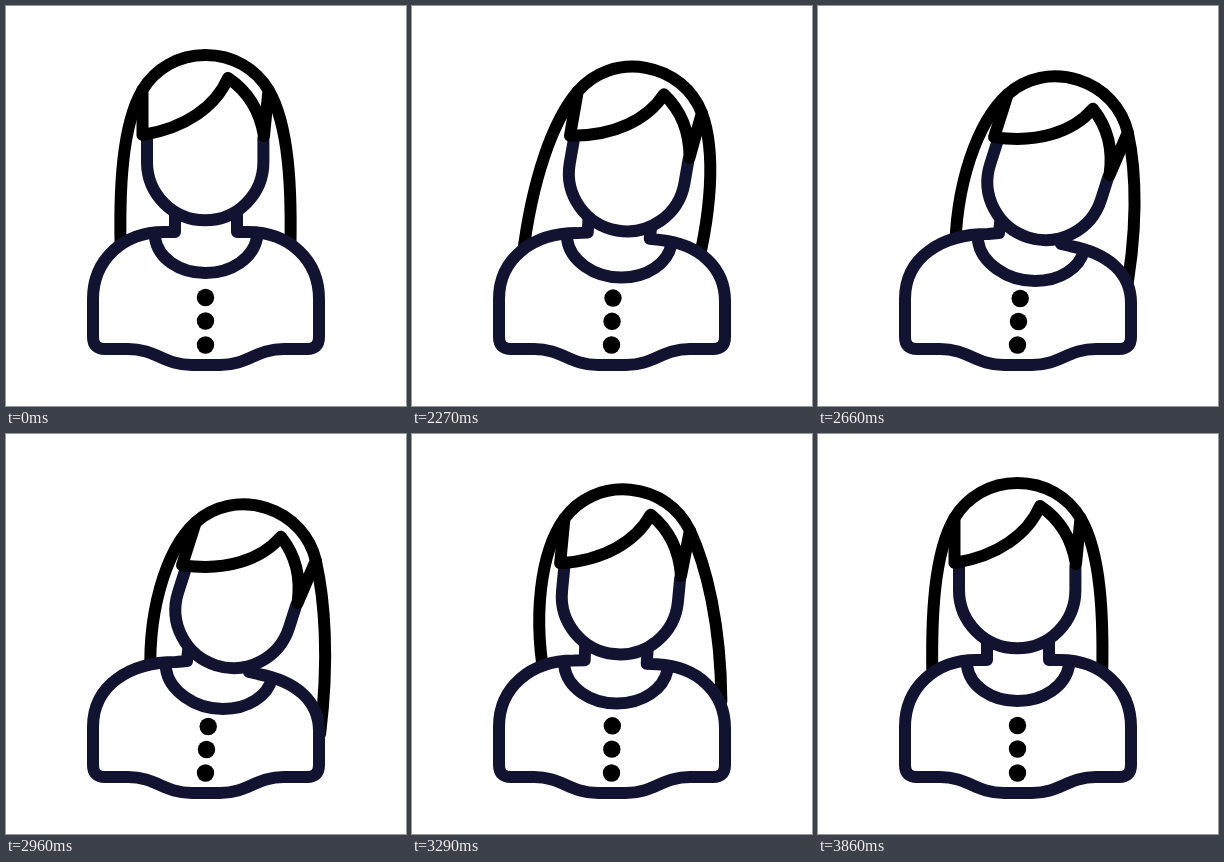
Write an HTML page that moves like this. It is 400x400 px and loops after 3890 ms.

```html
<!DOCTYPE html>
<html lang="en">
<head>
<meta charset="utf-8">
<title>Woman tilting her head</title>
<style>
  html, body { margin: 0; width: 100%; height: 100%; overflow: hidden; background: #fff; }
  svg { display: block; width: 100vw; height: 100vh; }
  path { fill: none; stroke-width: 12; stroke-linecap: round; stroke-linejoin: round; }
  .skin { stroke: #121331; }
  .hair { stroke: #000; }
  .solid { fill: #fff; }
</style>
</head>
<body>
<svg viewBox="0 0 400 400">
  <path id="strands" class="hair"/>
  <path id="body" class="skin solid"/>
  <path id="collar" class="skin"/>
  <circle class="button" r="8.7"/>
  <circle class="button" r="8.7"/>
  <circle class="button" r="8.7"/>
  <g id="head">
    <path class="skin solid" d="M141 132V156A58.2 58.2 0 0 0 257.4 156V132"/>
    <path class="hair" d="M136.5 84C149 63 172 49 199.5 49C227 49 250 63 262.5 84L258 130C254 106 243 86 222 72C210 100 180 122 136.5 129Z"/>
  </g>
</svg>
<script>
const LOOP = 3890, START = 2030, STEP = 30;
const PIVOT = [199.5, 156], TILT = 17.7, SHIFT = [28.4, 20];

// [time, value] keys, eased in and out between neighbours
const LEAN = [[2000, 0], [2500, 1], [2975, 1], [3475, 0]];
const SWING = [[2000, 0], [2390, 14], [2860, 6.7], [2980, 6.7], [3400, -4.2], [3680, 1.7], [3890, 0]];
const FAN = [[2000, 0], [2500, 1], [3400, 1], [3680, 0]];

// upright and leaning outlines with matching numbers
const BOTTOM = 'L313 331Q313 343 301 343L278 343C250 343 242 359 214 359L186 359C158 359 150 343 122 343L99 343Q87 343 87 331Z';
const BODY = [
  'M87 293C87 254 117 226 158 226L169 226L169 207L231 207L231 226L242 226C283 226 313 254 313 293' + BOTTOM,
  'M87 293C87 251 124 228 170 228L181 227L183 208L247 222L243 238L252 240C290 247 313 267 313 297' + BOTTOM
];
const COLLAR = [
  'M149 232C152 252 173 267 199.5 267C226 267 247 252 251 232',
  'M160 235C163 256 188 275 217 275C242 275 262 262 266 244'
];
const BUTTONS = [[291.5, 2.7, 1], [315, 1, 0.5], [339, 0, 0]];

const $ = id => document.getElementById(id);
const buttons = document.querySelectorAll('.button');
const add = (a, b) => [a[0] + b[0], a[1] + b[1]];

function track(keys, t) {
  if (t <= keys[0][0]) return keys[0][1];
  for (let i = 1; i < keys.length; i++) {
    const [t0, a] = keys[i - 1], [t1, b] = keys[i];
    if (t < t1) {
      const x = (t - t0) / (t1 - t0);
      return a + (b - a) * x * x * (3 - 2 * x);
    }
  }
  return keys[keys.length - 1][1];
}

function turn([x, y], deg) {
  const r = deg * Math.PI / 180, c = Math.cos(r), s = Math.sin(r);
  return [x * c - y * s, x * s + y * c];
}

function blend([from, to], k) {
  const ends = to.match(/-?[\d.]+/g);
  let i = 0;
  return from.replace(/-?[\d.]+/g, n => (+n + (ends[i++] - n) * k).toFixed(2));
}

// The root follows the head, the tip trails behind; fan spreads and bows both sides
function strand(side, lean, swing, fan) {
  const angle = TILT * lean;
  const centre = add(PIVOT, SHIFT.map(v => v * lean));
  const root = add(centre, turn([63 * side, -72], angle));
  const near = add(root, turn([20 * side, 34], angle));
  const tip = add(root, turn([21.5 * side, 172], swing - side * fan));
  const far = add(tip, turn([2.5 * side, -76], 1.5 * swing - 0.5 * angle + 4 * side * fan));
  return `M${root}C${near} ${far} ${tip}`;
}

function draw(time) {
  const t = time < START ? 0 : START + Math.floor((time - START) / STEP) * STEP;
  const lean = track(LEAN, t), swing = track(SWING, t), fan = track(FAN, t);
  $('strands').setAttribute('d', strand(-1, lean, swing, fan) + strand(1, lean, swing, fan));
  $('body').setAttribute('d', blend(BODY, lean));
  $('collar').setAttribute('d', blend(COLLAR, lean));
  $('head').setAttribute('transform',
    `translate(${SHIFT.map(v => v * lean)}) rotate(${TILT * lean} ${PIVOT})`);
  BUTTONS.forEach(([y, dx, dy], i) => {
    buttons[i].setAttribute('cx', 199.5 + dx * lean);
    buttons[i].setAttribute('cy', y + dy * lean);
  });
}

const begin = performance.now();
function tick() {
  draw((performance.now() - begin) % LOOP);
  requestAnimationFrame(tick);
}
tick();
</script>
</body>
</html>
```
